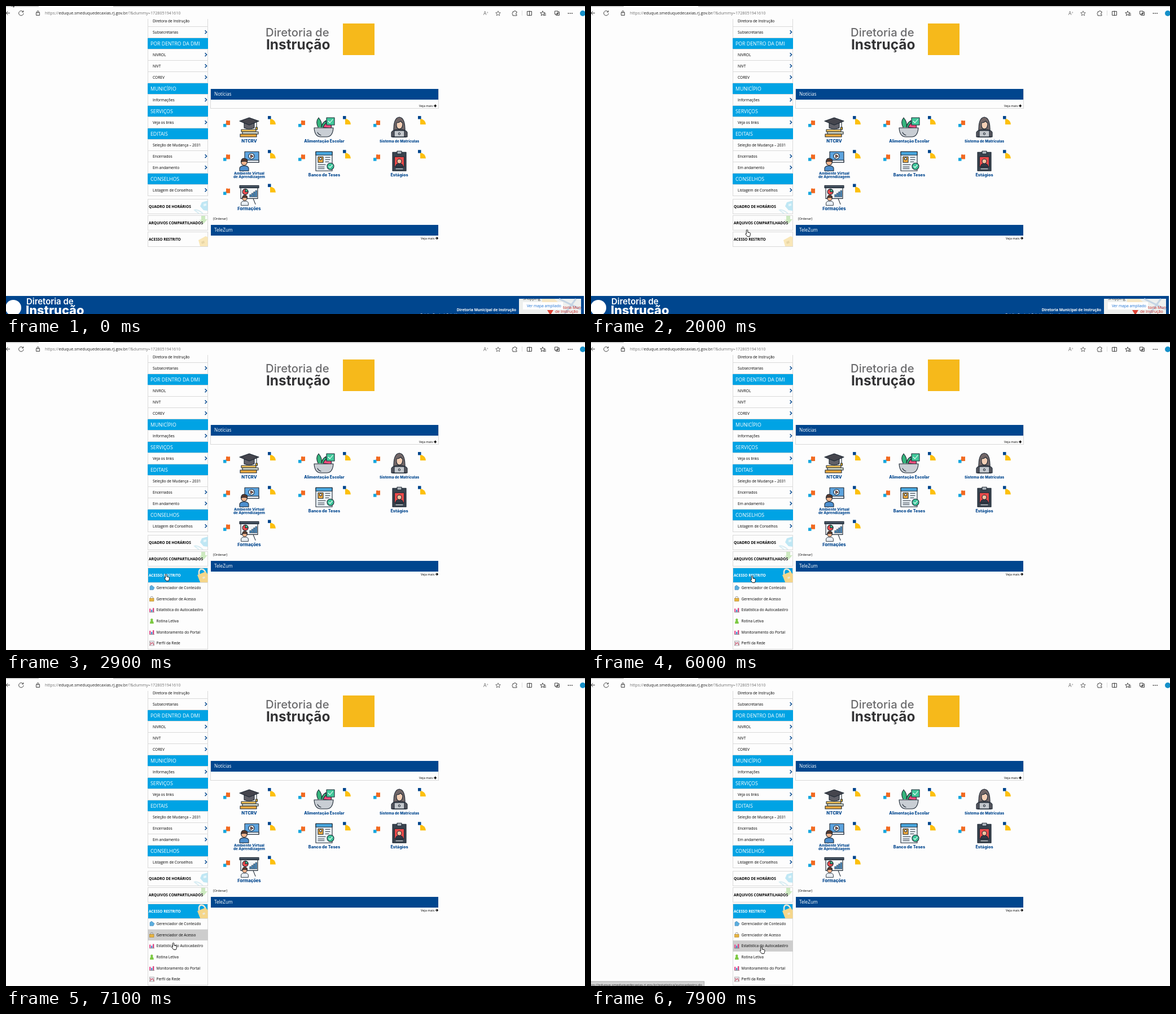
An HTML page for the animation above (8 s loop, 1026 by 546 pixels).

```html
<!DOCTYPE html>
<html lang="pt-BR">
<head>
<meta charset="utf-8">
<style>
html, body { margin: 0; width: 100%; height: 100%; overflow: hidden; background: #fdfdfd; }
svg { display: block; width: 1026px; height: 546px; font-family: "Open Sans", sans-serif; }
.brand { font-family: Inter, sans-serif; }
.ink { stroke: #1c2733; stroke-width: 1.1; stroke-linejoin: round; stroke-linecap: round; }
.line { fill: none; stroke: #444; stroke-width: 1; }
</style>
</head>
<body>
<svg id="stage" viewBox="0 0 1026 546"></svg>
<script>
const NAVY = '#00468e', SKY = '#00a3e4', GOLD = '#fdc00f', ORANGE = '#f26a21', EDGE = '#d9d9d9';
const LOOP = 8000, STEP = 100;

const text = (x, y, size, str, attrs = '') => `<text x="${x}" y="${y}" font-size="${size}" ${attrs}>${str}</text>`;
const rect = (x, y, w, h, fill, attrs = '') => `<rect x="${x}" y="${y}" width="${w}" height="${h}" fill="${fill}" ${attrs}/>`;
const path = (d, fill = 'none', attrs = '') => `<path d="${d}" fill="${fill}" ${attrs}/>`;
const circle = (x, y, r, fill, attrs = '') => `<circle cx="${x}" cy="${y}" r="${r}" fill="${fill}" ${attrs}/>`;
const group = (x, y, body, attrs = '') => `<g transform="translate(${x} ${y})" ${attrs}>${body}</g>`;
const framed = (x, y, w, h, fill = '#fdfdfd') => rect(x + .5, y + .5, w - 1, h - 1, fill, `stroke="${EDGE}"`);
const WHITE = 'fill="#fff"', BOLD = 'font-weight="700"';

function toolbar() {
  const star = 'M0-4.2 1.2-1.3 4.3-1.1 1.9.9 2.7 4 0 2.3-2.7 4-1.9.9-4.3-1.1-1.2-1.3z';
  return rect(0, 0, 1026, 23, '#fdfdfd') + rect(0, 0, 58, 1.5, '#c4c4c4') + rect(190, 0, 836, 1.5, '#c4c4c4') +
    path('M7 12.5H0M3.5 9 0 12.5 3.5 16', 'none', 'class="line"') +
    path('M30 10A4.2 4.2 0 1 0 31 13M30.8 8V10.8H28', 'none', 'class="line"') +
    path('M53.5 11.5h6v5h-6zM55 11.5V10a1.5 1.5 0 0 1 3 0v1.5M56.5 13.5v1', 'none', 'class="line" stroke-width=".8"') +
    text(69, 15.2, 7.2, '<tspan fill="#707070">https://</tspan>eduque.smeduquedecaxias.rj.gov.br<tspan fill="#707070">/?&amp;dummy=1728051941610</tspan>', 'fill="#222"') +
    text(846, 16, 8.5, 'A', 'fill="#666"') + text(852, 12.5, 5, '»', 'fill="#666"') +
    group(872, 13, path(star, 'none', 'class="line" stroke-opacity=".75"')) +
    path('M898 10h2.3a1.5 1.5 0 0 1 3 0h1.7v2.3a1.5 1.5 0 0 0 0 3V17h-7v-2a1.6 1.6 0 0 1 0-3z', 'none', 'class="line"') +
    rect(914, 8, 1, 9, '#ddd') +
    path('M923.5 9.5h8v7h-8zM927.5 8.5v9', 'none', 'class="line"') +
    group(951, 13, path(star, 'none', 'class="line"') + path('M3 1h3M3 3.3h3', 'none', 'class="line"')) +
    path('M972.5 9h5.5v5.5h-5.5zM974.5 14.5v2h6v-6H978M977.5 11.5v4M975.5 13.5h4', 'none', 'class="line"') +
    [996.5, 999.7, 1003].map(x => circle(x, 13, .9, '#333')).join('') +
    circle(1022, 13, 5, '#1590c9');
}

// '#' marks a section heading, '>' an item with a chevron
const MENU = ['Diretora de Instrução', '>Subsecretarias', '#POR DENTRO DA DMI', '>NIVROL', '>NIVT', '>COREV',
  '#MUNICÍPIO', '>Informações', '#SERVIÇOS', '>Veja os links', '#EDITAIS', 'Seleção de Mudança – 2031',
  '>Encerrados', '>Em andamento', '#CONSELHOS', '>Listagem de Conselhos'];

function sidebar() {
  return MENU.map((item, i) => {
    const y = 17 + i * 20, label = item.replace(/^[#>]/, '');
    if (item[0] === '#') return rect(251, y, 107, 20, SKY) + text(256, y + 13, 8.75, label, WHITE);
    return framed(251, y - 1, 107, 21) + text(260, y + 12.2, 6.6, label) +
      (item[0] === '>' ? path(`M352.6 ${y + 6.3}l3 3-3 3`, 'none', `stroke="${NAVY}" stroke-width="1.5"`) : '');
  }).join('');
}

const button = (y, label, art, fill, color = '#000') =>
  framed(251, y, 107, 27, fill) + art + text(253, y + 15.8, 6.5, label, `${BOLD} fill="${color}"`);

const padlock = (body, shackle) => path('M342 412V407Q343 401 349 403 353 405 354 411', 'none', `stroke="${shackle}" stroke-width="2.6"`) +
  path('M339 413 354 407 357.5 412V426H344z', body) + path('M348 417l4-1.5 1 3-4 1.5z', shackle);

function buttons() {
  const calendar = path('M335 361Q343 362 349 368M333 361 342 368', 'none', 'stroke="#d9edf3" stroke-width="2"') +
    path('M347 348 357.5 345V363L350 362 344 355z', '#bfe7f4') + path('M350 351l5-1v4l-5 1z', '#e5f6fb');
  const arrow = path('M346 372h7v6h4l-7 8-7-7h3z', '#cdeac0');
  const lock = path('M341 415 354 408 357.5 410V426H344z', '#f9e7b8') + path('M346 418l5-2 1 4-5 2z', '#e9d6a5');
  return button(342, 'QUADRO DE HORÁRIOS', calendar) + button(371, 'ARQUIVOS COMPARTILHADOS', arrow) +
    button(400, 'ACESSO RESTRITO', lock);
}

const bars = rect(0, 2, 2.3, 6, '#e8538f') + rect(3, 4, 2.3, 4, '#3a8fd0') + rect(6, 1, 2.3, 7, '#d84380') + rect(0, 8, 9, .7, '#555');
const SUBMENU = [
  ['Gerenciador de Conteúdo', path('M1 2 4 0 9 4 7 8H1z', '#5baede', 'stroke="#3a7fb5" stroke-width=".6"')],
  ['Gerenciador de Acesso', path('M2 4V2.5a2.3 2.3 0 0 1 4.6 0V4', 'none', 'stroke="#999"') + rect(.5, 3.5, 7.5, 5, '#e8b541', 'stroke="#a87b1d" stroke-width=".6"')],
  ['Estatística do Autocadastro', bars],
  ['Rotina Letiva', circle(4.3, 2.2, 2.2, '#7cc942') + path('M1 9Q1 3.5 4.3 3.5T7.8 9z', '#7cc942')],
  ['Monitoramento do Portal', bars],
  ['Perfil da Rede', rect(.5, .5, 8, 8, '#e7e7ee', 'stroke="#888" stroke-width=".6"') + path('M1 3 4 5 6 3 8 8M1 8 4 4', 'none', 'stroke="#c9334a"')]
];
const rowTop = i => 426 + i * 19.65;

const submenu = () => framed(251, 426, 107, 119) + rect(251, 0, 107, 19.6, '#cdcdcd', 'id="row"') +
  SUBMENU.map(([label, icon], i) => group(254, rowTop(i) + 5.3, icon) + text(266.5, rowTop(i) + 11.9, 6.55, label)).join('');

// Tile pictures, each centred on its own origin
const person = (x, y, coat, skin = '#f2b48c', hair = '#5b3a2c') => path(`M${x - 8} ${y + 17}V${y + 12}Q${x - 7} ${y + 8} ${x} ${y + 8}T${x + 8} ${y + 12}V${y + 17}z`, coat) +
  circle(x, y + 2, 5.3, skin) + path(`M${x - 5.5} ${y + 1}Q${x - 5} ${y - 6} ${x + 1} ${y - 5}T${x + 5.5} ${y + 1}Q${x} ${y - 1} ${x - 5.5} ${y + 1}z`, hair);
const ART = {
  cap: path('M-9-8V1Q0 5 9 1V-8', '#606068') + path('M0-17 17-11 0-4-17-11z', '#45454d') + path('M13-10V1') + rect(11.5, 0, 3, 4, GOLD) +
    rect(-14, 4, 26, 4, '#f6c75c') + rect(-12, 8, 28, 4, '#dfe3d0') + rect(-16, 12, 29, 5, '#e9a93f'),
  bowl: path('M-11 0Q-16-10-10-17-3-9-5 0M-5 0Q-4-8 3-12 4-5 2 1', '#35b57c') + path('M-2 0Q1-9 9-7 14-5 12 2z', '#ef4d7d') +
    path('M-18 1H16Q15 17 4 17H-6Q-17 17-18 1z', '#c9ced4') + path('M-12 9Q-10 13-6 14') + rect(4, -17, 14, 13, '#42c99b') + path('M7-11l3 3 5-6', 'none', 'stroke="#fff"'),
  laptop: path('M-10 9Q-11-17 0-18 11-17 10 9z', '#716667') + path('M-14 17V9Q-12 4 0 4T14 9V17z', '#55565e') +
    path('M-5-8Q0-8 2-11L6-7Q6 3 0 3T-5-8z', '#f4cfb5') + rect(-9, 6, 18, 11, '#c4c8cd') + circle(0, 11.5, 1.6, '#fff') + path('M-12 17.5H12'),
  video: rect(-8, -17, 25, 19, '#5da4df') + rect(-8, -2, 25, 4, '#e9eef3') + circle(4, -9, 5, '#fff') + path('M2.5-11.5V-6.5L7-9z', '#ef754d') + person(-9, 0, '#4d8fce'),
  thesis: rect(-15, -17, 29, 34, '#eef5fa') + rect(-15, -17, 29, 6, '#48a7df') + rect(-11, -8, 9, 10, '#f5ae3f') + circle(-6.5, -4.5, 2, '#fff') +
    path('M2-7H10M2-3H10M2 1H8M-11 6H2M-11 10H0M-11 13H0') + circle(11, 9, 6, '#3cc59a') + path('M8 9l2.2 2.2 4-4.5', 'none', 'stroke="#fff"'),
  badge: rect(-12, -16, 24, 33, '#39434e') + rect(-8.5, -8, 17, 18, '#ee4b4b') + rect(-4, -18, 8, 5, '#aeb6bd') +
    path('M-7 10Q-6 4 0 4T7 10z', '#303a46') + circle(0, 0, 4, '#f4c3a1') + path('M-6 13.5H6', 'none', 'stroke="#fff"'),
  board: rect(-17, -17, 34, 4, '#4a5866') + rect(-15, -13, 30, 19, '#f3f5f7') + circle(-7, -6, 5, '#ef4d4d') + path('M-7-6V-11A5 5 0 0 1-2-6z', '#45c08d') +
    [0, 1, 2, 3].map(i => rect(1 + i * 3.4, -1 - i * 2.4, 2.4, 4 + i * 2.4, '#3f8fcd', 'stroke-width=".6"')).join('') + path('M7 6 11 16') + group(-8, 4, `<g transform="scale(.8)">${person(0, 0, '#e8eef4')}</g>`)
};
const TILES = [
  ['cap', 7.7, 'NTCRV'], ['bowl', 7, 'Alimentação Escolar'], ['laptop', 6.4, 'Sistema de Matrículas'],
  ['video', 6.4, 'Ambiente Virtual', 'de Aprendizagem'], ['thesis', 7.3, 'Banco de Teses'], ['badge', 7.3, 'Estágios'],
  ['board', 7.5, 'Formações']
];

function tile([art, size, ...lines], i) {
  const label = (line, y) => text(0, y, size, line, `class="brand" font-weight="800" fill="${NAVY}" text-anchor="middle"`);
  return group(431 + i % 3 * 133, 215 + Math.floor(i / 3) * 60.2,
    path('M-42-4A8 8 0 0 1-34-12V-4z', ORANGE) + path('M-41-12H-38Q-34-11-34-4H-41z', ORANGE) + rect(-46, -6, 5.5, 5.5, '#16a7df') +
    path('M37-15A10 10 0 0 1 47-5H37z', GOLD) + rect(33, -20, 5.5, 5.5, NAVY) +
    `<g class="ink" fill="none">${ART[art]}</g>` +
    lines.map((line, k) => label(line, lines.length > 1 ? 23.6 + k * 6.6 : 27)).join(''));
}

function content() {
  const more = (x, y) => text(x, y, 5.5, 'Veja mais') + path(`M${x + 26} ${y - 2}h4M${x + 28} ${y - 4.2}l2.2 2.2-2.2 2.2`, 'none', 'stroke="#000" stroke-width="1.3"');
  const bar = (y, label) => rect(363, y, 403, 19, NAVY) + text(369, y + 12.4, 8.2, label, WHITE);
  return text(460, 54, 20.3, 'Diretoria de', 'class="brand" font-weight="500" fill="#6b6b6d"') +
    text(461, 77, 24.4, 'Instrução', `class="brand" ${BOLD} fill="#333335"`) +
    rect(597, 31, 56, 56, '#f6b91b') +
    framed(362, 147, 405, 35) + bar(147, 'Notícias') + more(732, 179) +
    TILES.map(tile).join('') + text(367, 379, 5.5, '[Ordenar]') + bar(388, 'TeleZum') + more(735, 413.7);
}

function footer() {
  return rect(0, 514, 1024, 32, NAVY) + circle(13, 535, 14, '#fff') +
    text(36, 529, 14.9, 'Diretoria de', `class="brand" font-weight="600" ${WHITE}`) +
    text(35, 546.5, 21.8, 'Instrução', `class="brand" font-weight="800" ${WHITE}`) +
    text(904, 541, 6.5, 'Diretoria Municipal de Instrução', `${BOLD} ${WHITE} text-anchor="end"`) +
    text(904, 549.5, 6.5, 'Prédio Central, Sala Um – Atendimento ao público diário', `${WHITE} text-anchor="end"`) +
    rect(909, 519, 110, 27, '#eef0ee') + path('M980 519 1019 538M990 546 1010 519', 'none', 'stroke="#c4d4e4" stroke-width="3"') +
    path('M950 519h22l6 6h-28z', '#f7e7c4') + `<svg x="909" y="519" width="110" height="27">${text(7, 2, 7, 'Shopping', 'fill="#333"')}` +
    rect(7, 6, 71, 13, '#fff') + text(14, 15, 6.7, 'Ver mapa ampliado', 'fill="#1a6fd0"') +
    text(78, 17.5, 7, 'toria Mun', 'fill="#c5221f"') + text(64, 25, 7, 'de Instrução', 'fill="#c5221f"') +
    path('M50 20h11l-5.5 9z', '#e04436') + '</svg>';
}

const status = () => rect(-1, 538, 201.5, 10, '#d3d3d3', 'stroke="#a8a8a8"') +
  text(197, 545.7, 6.15, 'https://eduque.smeduquedecaxias.rj.gov.br/estatistica/autocadastro.do', 'fill="#333" text-anchor="end"');

const layer = (id, body) => `<g id="${id}">${body}</g>`;
const cursorShape = (id, d) => path(d, '#fff', `id="${id}" stroke="#000" stroke-width=".9" stroke-linejoin="round"`);

document.getElementById('stage').innerHTML =
  rect(0, 0, 1026, 546, '#fdfdfd') + sidebar() + buttons() + content() + layer('footer', footer()) +
  layer('hover', button(400, 'ACESSO RESTRITO', padlock('#f5d68a', '#ece7d6'), SKY, '#fff')) +
  layer('submenu', submenu()) + layer('status', status()) + toolbar() +
  layer('cursor', cursorShape('arrow', 'M.5.5V9.6L2.6 7.7 4 11 5.5 10.4 4.1 7.2H6.9z') +
    cursorShape('hand', 'M3.5.5Q4.8.5 4.8 1.8V5L8.4 5.8Q9.6 6.1 9.5 7.4L9 10.4 8.2 12.6H4L1 8.6Q.4 7.4 1.4 7.1L2.3 7.8V1.8Q2.3.5 3.5.5z'));

const $ = id => document.getElementById(id);
const show = (id, on) => $(id).style.display = on ? '' : 'none';

// Pointer stops: time, x, y
const TRAIL = [[0, 9, -9], [500, 139, 266], [700, 139, 266], [1100, 171, 323], [1400, 238, 322], [1500, 238, 322],
  [2100, 280, 411], [5900, 280, 411], [6000, 282, 414], [6100, 287, 424], [6200, 287, 424],
  [7100, 293, 469], [7200, 293, 469], [7900, 298.5, 476], [LOOP, 298.5, 476]];

function pointerAt(t) {
  const i = TRAIL.findIndex(stop => stop[0] > t);
  const [t0, x0, y0] = TRAIL[i - 1], [t1, x1, y1] = TRAIL[i];
  const k = (t - t0) / (t1 - t0);
  return [x0 + (x1 - x0) * k, y0 + (y1 - y0) * k];
}

function render(now) {
  const t = Math.floor(now % LOOP / STEP) * STEP;
  const row = t < 6300 ? -1 : t < 6800 ? 0 : t < 7300 ? 1 : 2;
  show('hover', t >= 2800);
  show('submenu', t >= 2900);
  show('footer', t < 2900);
  show('status', t >= 7600);
  show('row', row >= 0);
  $('row').setAttribute('y', rowTop(Math.max(row, 0)));
  show('arrow', t < 1800);
  show('hand', t >= 1800);
  $('cursor').setAttribute('transform', `translate(${pointerAt(t)})`);
  requestAnimationFrame(render);
}
requestAnimationFrame(render);
</script>
</body>
</html>
```
